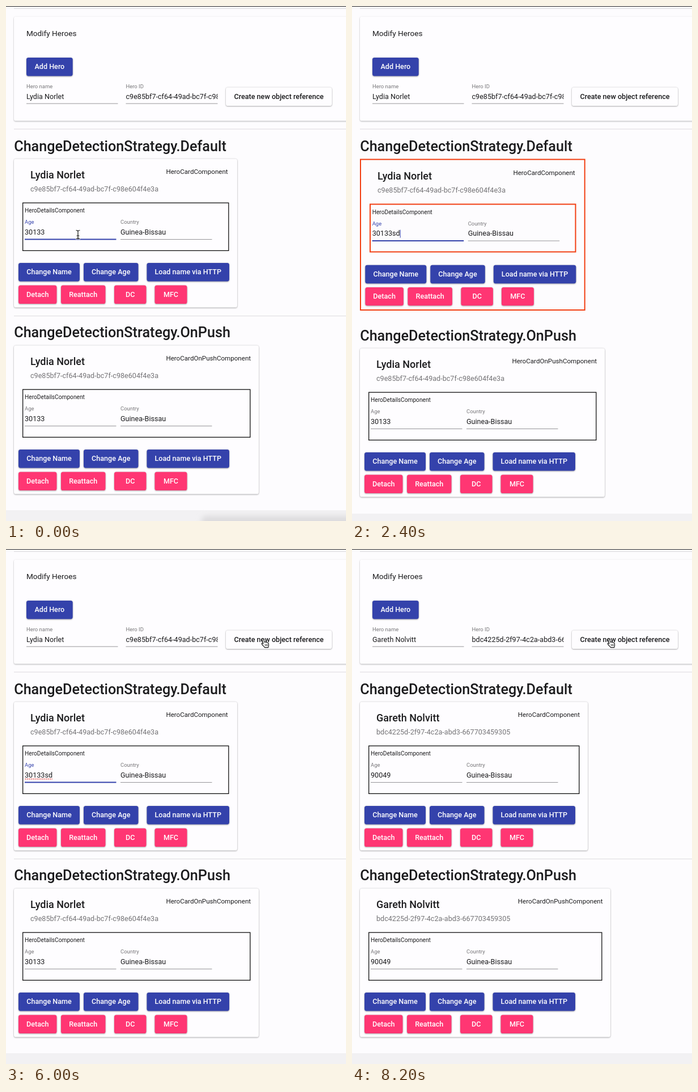
Write an HTML page that moves like this. It is 600 px wide and 908 px high and loops after 8.3 s.

```html
<!DOCTYPE html>
<html lang="en">
<head>
<meta charset="utf-8">
<title>Change detection demo</title>
<style>
  html, body { margin: 0; width: 100%; height: 100%; overflow: hidden; background: #fdfcfe; }
  svg { display: block; width: 600px; height: 908px; }
  text { font: 400 12.6px Roboto, sans-serif; fill: #1b1b1d; white-space: pre; }
  .h1 { font-size: 25.2px; font-weight: 500; }
  .title { font-size: 18px; font-weight: 500; }
  .sub { fill: #757477; }
  .label { font-size: 9.45px; fill: #767578; }
  .name { font-size: 11.6px; }
  .detail { font-size: 10.2px; }
  .head { font-size: 13.6px; }
  .btn { font-weight: 500; text-anchor: middle; }
  .light { fill: #fff; }
  .focus { fill: #3442ab; }
  .raised { filter: drop-shadow(0 1px 1px rgba(0,0,0,.26)) drop-shadow(0 0 1px rgba(0,0,0,.16)); }
  .dark .raised { filter: drop-shadow(0 1.5px 1px rgba(0,0,0,.3)); }
  .cursor { fill: #fff; stroke: #111; stroke-width: 1.1; stroke-linejoin: round; }
</style>
</head>
<body>
<svg viewBox="0 0 600 908">
  <defs>
    <filter id="soft" x="-20%" y="-100%" width="140%" height="300%"><feGaussianBlur stdDeviation="5"/></filter>
    <clipPath id="idClip"><rect x="211" y="148" width="162.5" height="22"/></clipPath>
  </defs>
  <rect width="600" height="908" fill="#fdfcfe"/>
  <g id="page"></g>
  <g id="pointer">
    <g id="beam" fill="none" stroke-linecap="round">
      <path d="M-3-7.5Q0-7.5 0-5.5Q0-7.5 3-7.5M0-5.5V5.5M-3 7.5Q0 7.5 0 5.5Q0 7.5 3 7.5M-2 2H2" stroke="#fff" stroke-width="2.6"/>
      <path d="M-3-7.5Q0-7.5 0-5.5Q0-7.5 3-7.5M0-5.5V5.5M-3 7.5Q0 7.5 0 5.5Q0 7.5 3 7.5M-2 2H2" stroke="#111" stroke-width="1.2"/>
    </g>
    <path id="arrow" d="M0 0V14L3.2 11L5.2 15.6L7.4 14.6L5.4 10.2H9.8Z" fill="#111" stroke="#fff"/>
    <g id="hand" class="cursor">
      <path d="M-1.3 1.5a1.4 1.4 0 0 1 2.8-.6l1.5 5.5c.8-1 2-.9 2.6 .2c.9-.7 2-.4 2.4 .6c1-.4 2 .1 2.2 1.2l.4 3.2l-.8 4H3.6c-1.5-2-3.5-3.5-5.2-6c-.8-1.3 .6-2.4 1.8-1.3l.8 .8z"/>
      <path d="M4.2 9.5l.4 3.6M6.3 9.5l.3 3.6M8.2 9.5l.2 3.6" stroke-width=".8"/>
    </g>
  </g>
</svg>
<script>
const LOOP = 8300;
const BLUE = '#3442ab', PINK = '#ff3673', FLASH = '#f23f12';
const TYPE_S = 500, TYPE_D = 2300, BLUR = 6100, SWAP = 6200, GLOW = 1500;
const MOVE = [4600, 5300], FROM = [127, 403], TO = [453, 158];

const heroes = [
  { name: 'Lydia Norlet', id: 'c9e85bf7-cf64-49ad-bc7f-c98e604f4e3a', age: '30133', edges: [408, 446], labelX: 282.4 },
  { name: 'Gareth Nolvitt', id: 'bdc4225d-2f97-4c2a-abd3-667703459305', age: '90049', edges: [416, 456], labelX: 292.8 }
];
// label, left, width, row, colour
const buttons = [
  ['Change Name', 22, 108, 0, BLUE], ['Change Age', 137, 96.5, 0, BLUE], ['Load name via HTTP', 248.5, 145.5, 0, BLUE],
  ['Detach', 22, 67.5, 1, PINK], ['Reattach', 97, 78.5, 1, PINK], ['DC', 191, 56.5, 1, PINK], ['MFC', 262.5, 57, 1, PINK]
];

const $ = id => document.getElementById(id);
const text = (x, y, s, cls = '', extra = '') => `<text x="${x}" y="${y}" class="${cls}" ${extra}>${s}</text>`;
const rect = (x, y, w, h, fill, extra = '') => `<rect x="${x}" y="${y}" width="${w}" height="${h}" fill="${fill}" ${extra}/>`;
const frame = (x, y, w, h, color, weight) =>
  rect(x + weight / 2, y + weight / 2, w - weight, h - weight, 'none', `stroke="${color}" stroke-width="${weight}"`);
const group = (x, y, s, cls = '') => `<g transform="translate(${x} ${y})" class="${cls}">${s}</g>`;
const rule = y => rect(14, y, 586, 1, '#dddcdf');

function button(label, x, y, w, fill, light = true) {
  return rect(x, y, w, 32.4, fill, 'rx="3.6" class="raised"') +
    text(x + w / 2, y + 20.2, label, 'btn' + (light ? ' light' : ''));
}

function field(label, value, x, y, focus, id = '') {
  return text(x, y, label, focus ? 'label focus' : 'label') +
    text(x, y + 18.5, value, '', id && `id="${id}"`) +
    (focus ? rect(x, y + 26, 161.5, 2, BLUE) : rect(x, y + 26.6, 161.5, .9, '#8b8a8d'));
}

function toolbar(hero) {
  return rect(0, 0, 600, 1, '#222') + rule(4) +
    group(0, 0, rect(14, 18.5, 620, 184, '#fefdff', 'rx="3.6" class="raised"'), 'dark') +
    text(36, 52.8, 'Modify Heroes', 'head') +
    button('Add Hero', 36, 91, 81.7, BLUE) +
    field('Hero name', hero.name, 36, 145, false) +
    text(211.5, 145, 'Hero ID', 'label') +
    text(211.5, 163.7, hero.id, '', 'clip-path="url(#idClip)"') +
    rect(211.5, 171.6, 162, .9, '#8b8a8d') +
    button('Create new object reference', 388, 143.6, 187, '#fefdff', false) +
    rule(216.5);
}

// A glowing card gains a border that pushes its content inwards.
function card(hero, kind, glow, age, focus) {
  const right = hero.edges[kind];
  const inner = right - (kind ? 14.5 : 14.5);
  const d = glow ? 2 : 0;
  const heading = text(hero.labelX, 295.6, kind ? 'HeroCardOnPushComponent' : 'HeroCardComponent', 'name') +
    text(43, 303.5, hero.name, 'title') +
    text(43, 327.4, hero.id, 'sub');
  const details = text(33, 364.3, 'HeroDetailsComponent', 'detail') +
    field('Age', age, 33, 384.4, focus, kind ? '' : 'age') +
    (kind ? '' : '<g id="caret"></g>') +
    field('Country', 'Guinea-Bissau', 202, 384.4, false);
  const row = n => buttons.filter(b => b[3] === n)
    .map(([s, x, w, , fill]) => button(s, x, n ? 492.6 : 453, w, fill)).join('');
  const shell = glow
    ? frame(14, 269.5, right - 10.3, 267.5, FLASH, 2)
    : rect(14, 269.5, right - 14, 262, '#fefdff', 'rx="3.6" class="raised"');
  return shell + group(d, d, heading) +
    frame(29 + d, 346.5 + d, inner - 29, 85.5 + d / 4, glow ? FLASH : '#111', glow ? 2 : 1.3) +
    group(d * 1.35, d * 1.3, details) +
    group(d * .65, d * 1.9, row(0)) + group(d * .7, d * 1.65, row(1));
}

function stateAt(t) {
  const swapped = t >= SWAP;
  const glowing = [TYPE_S, TYPE_D, SWAP].some(s => t >= s && t < s + GLOW);
  const typed = t >= TYPE_D ? 'sd' : t >= TYPE_S ? 's' : '';
  const lastKey = t >= TYPE_D ? TYPE_D : TYPE_S;
  return {
    swapped, glowing, typed,
    focus: t < BLUR,
    caret: typed !== '' && t < BLUR && Math.floor((t - lastKey) / 500) % 2 === 0,
    spell: t >= TYPE_D + GLOW && !swapped,
    shade: t < TYPE_S
  };
}

function render(s) {
  const hero = heroes[+s.swapped];
  const both = s.glowing && s.swapped;
  const push = s.glowing ? 5 : 0;
  const floor = both ? 900 : s.glowing ? 895 : 889;
  $('page').innerHTML =
    rect(0, floor, 600, 20, '#f2f1f3') +
    (s.shade ? rect(345, 899, 300, 30, '#dddcde', 'rx="8" filter="url(#soft)"') : '') +
    toolbar(hero) +
    text(14.2, 255.6, 'ChangeDetectionStrategy.Default', 'h1') +
    card(hero, 0, s.glowing, s.swapped ? hero.age : hero.age + s.typed, s.focus) +
    (s.glowing ? '' : rule(546)) +
    text(14.2, 584 + (s.glowing ? 6 : 0), 'ChangeDetectionStrategy.OnPush', 'h1') +
    group(0, 329 + push, card(hero, 1, both, hero.age, false));
  const end = 33 + $('age').getComputedTextLength();
  $('caret').innerHTML =
    (s.caret ? rect(end, 392, 1, 14, BLUE) : '') +
    (s.spell ? `<path d="M33.5 405.5H${end}" stroke="#e8463f" stroke-width="1.4" stroke-dasharray="2 1.4"/>` : '');
}

function movePointer(t) {
  const p = Math.min(1, Math.max(0, (t - MOVE[0]) / (MOVE[1] - MOVE[0])));
  const e = p * p * (3 - 2 * p);
  const [x, y] = FROM.map((a, i) => a + (TO[i] - a) * e);
  const shape = y > 375 ? 'beam' : x > 388 && y < 176 ? 'hand' : 'arrow';
  const hidden = t >= TYPE_S && t < MOVE[0];
  for (const id of ['beam', 'arrow', 'hand']) $(id).style.display = id === shape && !hidden ? '' : 'none';
  $('pointer').setAttribute('transform', `translate(${x} ${y})`);
}

let shown = '';
const start = performance.now();
function tick() {
  const t = Math.max(0, performance.now() - start) % LOOP;
  const state = stateAt(t), key = JSON.stringify(state);
  if (key !== shown) {
    render(state);
    shown = key;
  }
  movePointer(t);
  requestAnimationFrame(tick);
}
tick();
</script>
</body>
</html>
```
